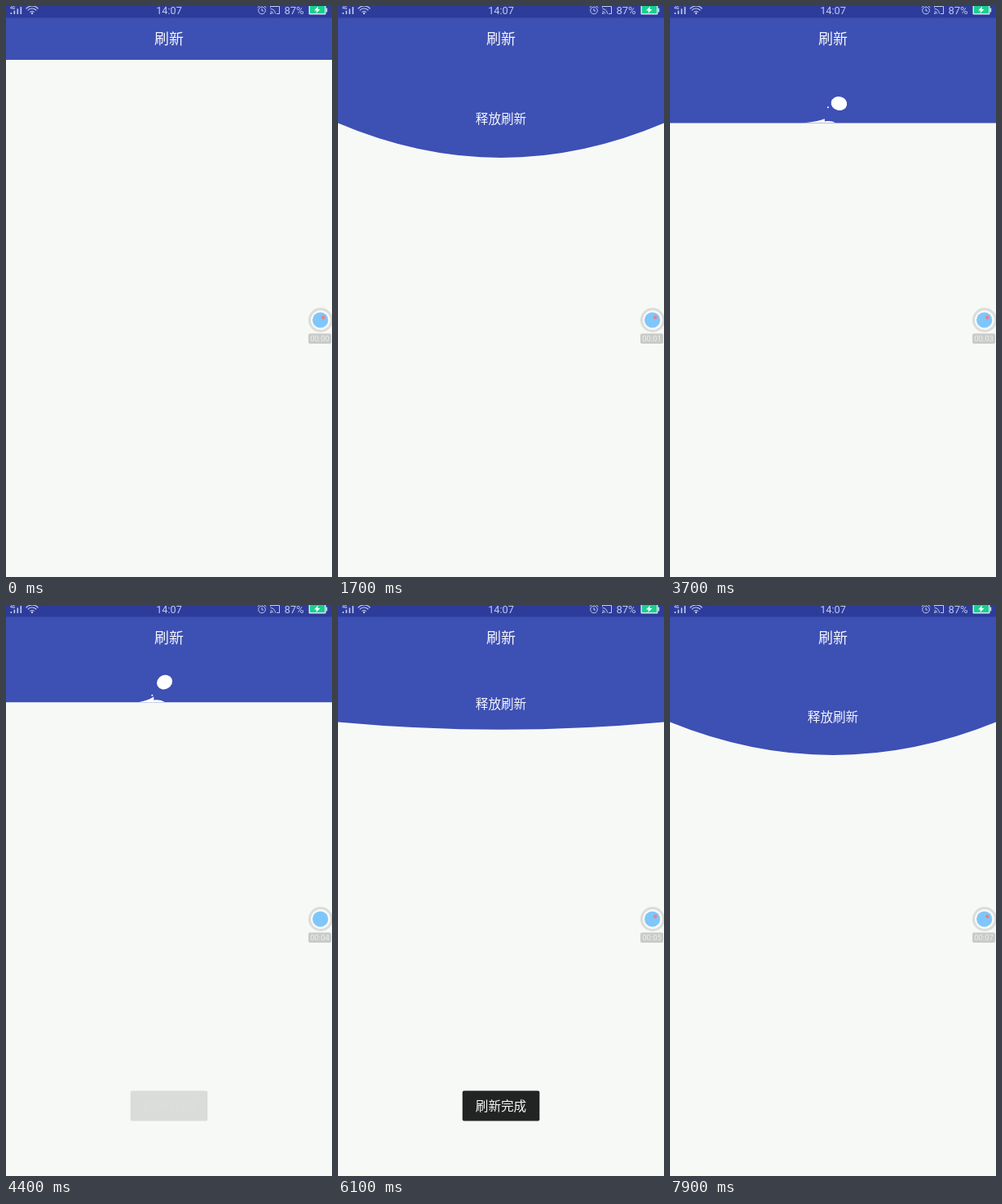
Write an HTML page with a canvas that moves like this. It is 400x700 px and loops after 8 s.

```html
<!DOCTYPE html>
<html lang="zh-CN">
<head>
<meta charset="utf-8">
<style>
html, body { margin: 0; width: 100%; height: 100%; overflow: hidden; background: #f7f9f6; }
canvas { display: block; }
</style>
</head>
<body>
<canvas id="stage" width="400" height="700"></canvas>
<script>
const c = document.getElementById('stage').getContext('2d');
const LOOP = 8000, BAR = 66, REST = 143.5;
const INDIGO = '#3d50b3', PALE = '#f7f9f6', ICON = '#c3caea';
const CJK = '"Noto Sans CJK SC", "Noto Sans CJK", sans-serif';
const FIRST_PULL = [[450, 66], [750, 112], [1000, 149], [1400, 176], [1700, 186], [1950, 187]];
const SECOND_PULL = [[5450, 66], [5950, 143], [6400, 172], [6900, 187], [7200, 188], [7900, 184]];
const JUMP = { start: 2480, period: 821, flight: 660 };

const clamp = (v, lo = 0, hi = 1) => Math.min(hi, Math.max(lo, v));
const ramp = (t, from, to) => clamp((t - from) / (to - from));
const smooth = x => (1 - Math.cos(Math.PI * x)) / 2;

function along(keys, t) {
  const i = keys.findIndex(k => t < k[0]);
  if (i === 0) return keys[0][1];
  if (i < 0) return keys[keys.length - 1][1];
  const [t0, a] = keys[i - 1], [t1, b] = keys[i];
  return a + (b - a) * (t - t0) / (t1 - t0);
}

// Lowest point of the header at its centre
function headerDepth(t) {
  if (t < 1950) return along(FIRST_PULL, t);
  if (t < 4250) {
    const s = t - 1950;
    return REST + 43.5 * Math.exp(-s / 95) * Math.cos(s / 75);
  }
  if (t < 5450) return REST + (BAR - REST) * smooth(ramp(t, 4250, 4650));
  return along(SECOND_PULL, t);
}

function text(str, x, y, font, color, align = 'center') {
  c.font = font;
  c.fillStyle = color;
  c.textAlign = align;
  c.textBaseline = 'alphabetic';
  c.fillText(str, x, y);
}

function disc(x, y, r, color) {
  c.fillStyle = color;
  c.beginPath();
  c.arc(x, y, r, 0, 7);
  c.fill();
}

function box(x, y, w, h, r, color) {
  c.fillStyle = color;
  c.beginPath();
  c.roundRect(x, y, w, h, r);
  c.fill();
}

function line(points) {
  c.beginPath();
  points.forEach(([x, y]) => c.lineTo(x, y));
  c.stroke();
}

function arc(x, y, r, a0, a1) {
  c.beginPath();
  c.arc(x, y, r, a0, a1);
  c.stroke();
}

function splash(x, surface, age) {
  if (age < 0 || age > 320) return;
  const tall = 7.5 * Math.sin(Math.PI * age / 320);
  const peak = x + 11 + age * 0.07;
  c.fillStyle = '#fff';
  c.beginPath();
  c.moveTo(x, surface);
  c.quadraticCurveTo(peak - 7, surface - tall * 0.35, peak, surface - tall);
  c.lineTo(peak, surface - tall * 0.4);
  c.quadraticCurveTo(peak + 8, surface - tall * 0.6, peak + 14, surface);
  c.fill();
  const rise = age - 118;
  disc(peak - 2 + rise * 0.05, surface - 8.5 - rise * 0.15 + rise * rise * 0.0005, 1, '#fff');
}

function jumpingBall(t, surface) {
  if (t < JUMP.start || t > 4650) return;
  const age = (t - JUMP.start) % JUMP.period;
  const p = age / JUMP.flight;
  splash(162, surface, age - 160);
  splash(220, surface, age - 560);
  if (p > 1) return;
  c.fillStyle = '#fff';
  c.beginPath();
  c.ellipse(165 + 70 * p, surface + 8.5 - 136 * p * (1 - p), 9.8, 8.5, -0.2 - 1.9 * (1 - 2 * p), 0, 7);
  c.fill();
}

function header(t) {
  const depth = headerDepth(t);
  const pulling = t < 1950 || t >= 5450;
  const edge = Math.min(depth, REST);
  const sideY = pulling || t > 4250 ? edge : REST;
  c.save();
  c.fillStyle = INDIGO;
  c.beginPath();
  c.moveTo(0, 0);
  c.lineTo(0, sideY);
  c.quadraticCurveTo(200, 2 * depth - sideY, 400, sideY);
  c.lineTo(400, 0);
  c.fill();
  c.clip();
  c.beginPath();
  c.rect(0, BAR, 400, 200);
  c.clip();
  if (pulling && depth > BAR + 1) {
    const label = depth < REST ? '下拉刷新' : '释放刷新';
    text(label, 200, (depth + 89) / 2 + 6, '15.6px ' + CJK, '#f3f5fc');
  }
  jumpingBall(t, sideY);
  c.restore();
  text('刷新', 200, 47, '18px ' + CJK, '#f5f6fc');
}

function statusBar() {
  c.fillStyle = '#2d3c9b';
  c.fillRect(0, 0, 400, 14.5);
  c.fillStyle = c.strokeStyle = ICON;
  for (let i = 0; i < 4; i++) c.fillRect(5.5 + i * 4, 8 - i * 2.3, 1.6, 2 + i * 2.3);
  text('4G', 5, 4, 'bold 5px Roboto, sans-serif', ICON, 'left');
  c.lineWidth = 1.2;
  for (const r of [3.5, 7, 10]) arc(32, 10, r, -Math.PI * 0.77, -Math.PI * 0.23);
  disc(32, 9, 1.2, ICON);

  text('14:07', 200, 10.3, '12.7px Roboto, sans-serif', ICON);

  c.lineWidth = 1;
  arc(314, 5.5, 4.3, 0, 7);
  line([[314, 3], [314, 6], [316, 6]]);
  line([[308.7, 2], [311, 0]]);
  line([[317, 0], [319.3, 2]]);

  line([[324.5, 2], [324.5, 0.5], [335.5, 0.5], [335.5, 9.5], [332, 9.5]]);
  for (const r of [3, 6]) arc(324.5, 9.5, r, -Math.PI / 2, 0);
  disc(325, 9, 1, ICON);

  text('87%', 353.5, 9.7, '13px Roboto, sans-serif', ICON);
  box(371.5, -1, 21, 11.5, 1, '#d9e4f0');
  box(373, 0, 18, 9, 0, '#18cf91');
  box(392.5, 2.5, 1.7, 5, 0.5, '#d9e4f0');
  c.fillStyle = '#fff';
  c.beginPath();
  [[383, 0.5], [378, 5.5], [381, 5.5], [380.5, 9], [385.5, 4], [382.5, 4]].forEach(([x, y]) => c.lineTo(x, y));
  c.fill();
}

function recorder(t) {
  disc(386, 385, 15, '#dcdcd8');
  disc(386, 385, 12, '#f8f9f8');
  disc(385.7, 385, 9.6, '#7fc6fb');
  const blink = t % 1200;
  if (blink < 740 || blink > 960) disc(389.3, 381.8, 2.3, '#ee7f84');
  const seconds = Math.max(0, Math.floor((t - 1250) / 985) + 1);
  box(371, 401.5, 28, 12.5, 2, '#c9cbc9');
  text('00:0' + seconds, 385, 411.3, '9.5px Roboto, sans-serif', '#eceeec');
}

function toast(t) {
  const alpha = ramp(t, 4340, 4800) * (1 - ramp(t, 6850, 7350));
  if (!alpha) return;
  c.globalAlpha = alpha;
  box(152.7, 595.5, 94.6, 37, 2, '#222424');
  text('刷新完成', 200, 619.8, '15.6px ' + CJK, '#f7f7f7');
  c.globalAlpha = 1;
}

function draw(now) {
  const t = now % LOOP;
  c.fillStyle = PALE;
  c.fillRect(0, 0, 400, 700);
  header(t);
  statusBar();
  recorder(t);
  toast(t);
}

const begin = performance.now();
function tick() {
  draw(performance.now() - begin);
  requestAnimationFrame(tick);
}
tick();
</script>
</body>
</html>
```
